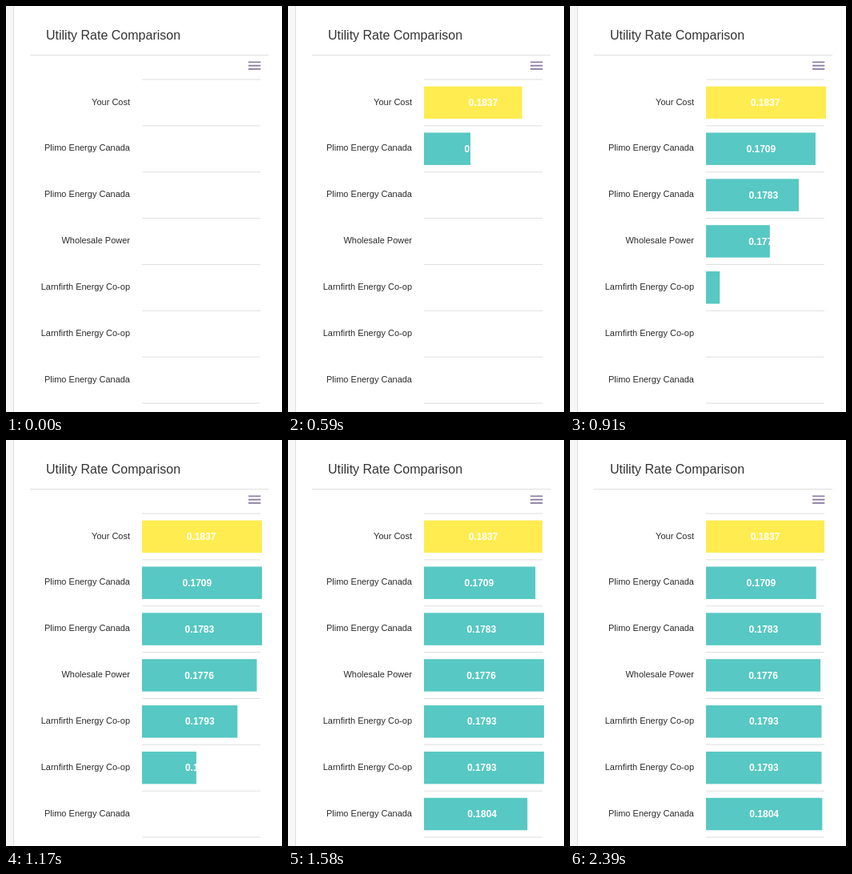
An HTML page for the animation above (2750 ms loop, 345 by 508 pixels).

```html
<!DOCTYPE html>
<html lang="en">
<head>
<meta charset="utf-8">
<title>Utility Rate Comparison</title>
<style>
html, body { margin: 0; width: 100%; height: 100%; overflow: hidden; background: #fff; }
svg { display: block; font-family: "Liberation Sans", Arial, sans-serif; }
.title { font-size: 16px; fill: #333; }
.name { font-size: 11px; fill: #2b2b2b; text-anchor: end; }
.value { font-size: 12px; font-weight: bold; fill: #fff; text-anchor: middle; }
</style>
</head>
<body>
<svg id="chart" width="345" height="508" viewBox="0 0 345 508">
  <rect width="9" height="508" fill="#f7f7f7"/>
  <rect x="9" width="1" height="508" fill="#dedede"/>
  <text class="title" x="50" y="42">Utility Rate Comparison</text>
  <rect x="30" y="61" width="298" height="1" fill="#dfdfdf"/>
  <path d="M303 69.4h15.3v1.7H303zM303 73.7h15.3v1.7H303zM303 78h15.3v1.7H303z" fill="#8878a0"/>
</svg>
<script>
const LOOP = 2750, FIRST = 380, LAST = 2390;
const LEFT = 170, TOP = 92, PITCH = 57.86, FULL = 148, CLIP = 150;
const PLIMO = 'Plimo Energy Canada', LARN = 'Larnfirth Energy Co-op';

// name, rate, start and duration of growth in ms
const rows = [
  ['Your Cost', 0.1837, 250, 1330],
  [PLIMO, 0.1709, 463, 1225],
  [PLIMO, 0.1783, 616, 1200],
  ['Wholesale Power', 0.1776, 743, 1145],
  [LARN, 0.1793, 880, 1140],
  [LARN, 0.1793, 1028, 1203],
  [PLIMO, 0.1804, 1231, 1207]
];
const chart = document.getElementById('chart');

function add(tag, attrs, text = '') {
  const el = document.createElementNS('http://www.w3.org/2000/svg', tag);
  for (const key in attrs) el.setAttribute(key, attrs[key]);
  el.textContent = text;
  chart.append(el);
  return el;
}

for (let i = 0; i <= rows.length; i++)
  add('rect', { x: LEFT, y: TOP - 0.5 + i * PITCH, width: FULL, height: 1, fill: '#dedede' });

const bars = rows.map(([name, rate, start, duration], i) => {
  const y = i * PITCH, size = rate / rows[0][1] * FULL;
  add('text', { class: 'name', x: 155, y: Math.round(123.6 + y) }, name);
  const el = add('rect', {
    x: LEFT, y: TOP + 8.6 + y, width: 0, height: 40.5, fill: i ? '#57c8c3' : '#ffec50'
  });
  // White on white: the value shows only where the bar is behind it
  add('text', { class: 'value', x: LEFT + size / 2, y: Math.round(125 + y) }, rate.toFixed(4));
  return { el, size, start, duration };
});

function backOut(p) {
  const q = 1 - Math.min(1, Math.max(0, p));
  return 1 + q * q * (1.70158 - 2.70158 * q);
}

function draw(now) {
  const t = now % LOOP;
  for (const { el, size, start, duration } of bars) {
    const grown = t < FIRST ? 0 : t >= LAST ? 1 : backOut((t - start) / duration);
    el.setAttribute('width', Math.min(CLIP, Math.max(0, size * grown)));
  }
}

let origin;
function tick(now) {
  origin ??= now;
  draw(now - origin);
  requestAnimationFrame(tick);
}
requestAnimationFrame(tick);
</script>
</body>
</html>
```
